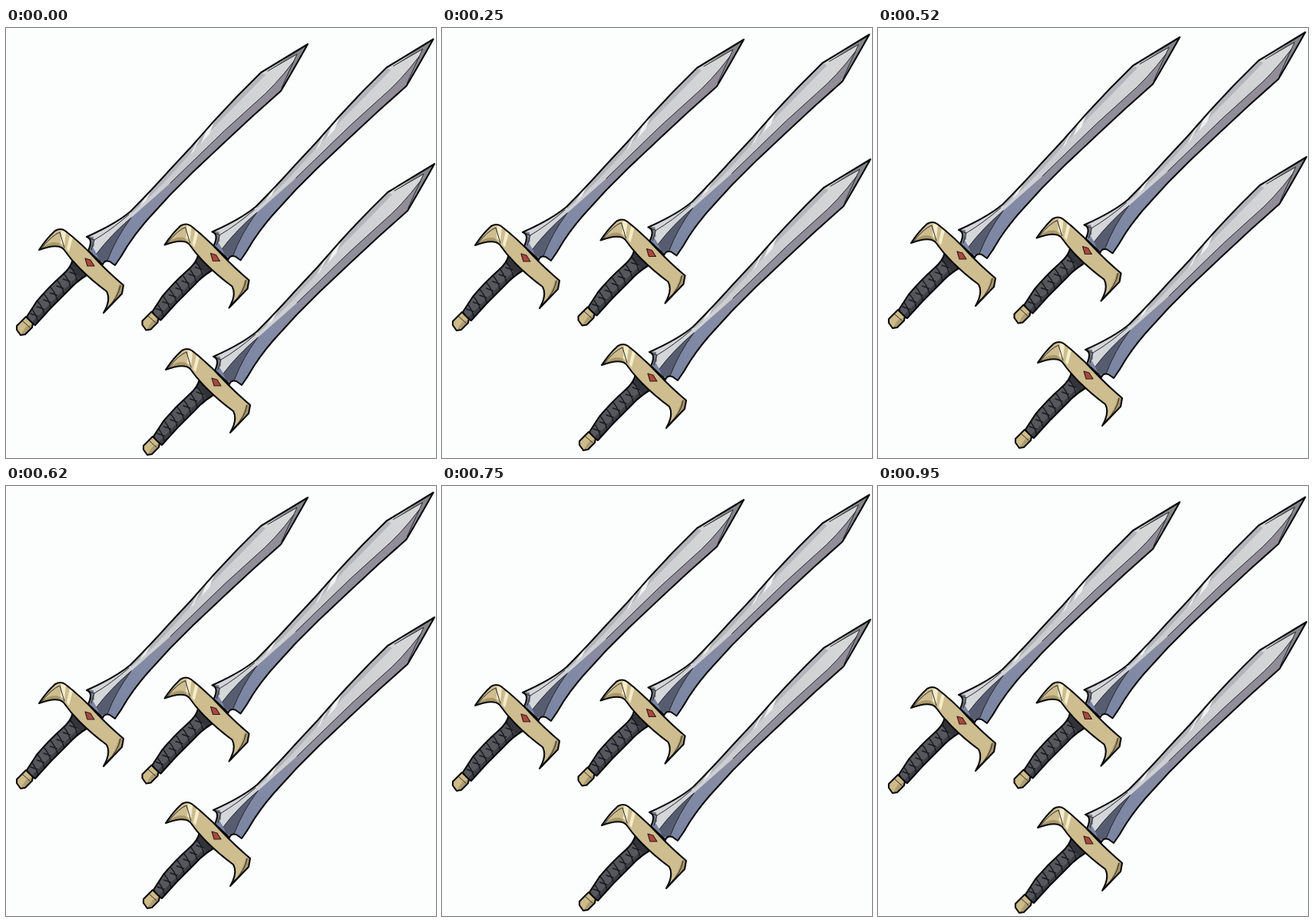
Recreate the animation shown at these times as an HTML page. Size 560 px wide and 560 px high, loop 1 s.

```html
<!DOCTYPE html>
<html lang="en">
<head>
<meta charset="utf-8">
<title>Floating swords</title>
<style>
  html, body { margin: 0; width: 100%; height: 100%; overflow: hidden; background: #fcfefd; }
  svg { display: block; width: 100%; height: 100%; }
  .ink { fill: none; stroke: #08080a; stroke-width: 2.1; stroke-linejoin: round; stroke-linecap: round; }
  .fine { fill: none; stroke: #25252c; stroke-width: 1; stroke-linejoin: round; stroke-linecap: round; }
</style>
</head>
<body>
<svg viewBox="0 0 560 560">
  <defs>
    <linearGradient id="steel" gradientUnits="userSpaceOnUse" x1="370" y1="50" x2="130" y2="300">
      <stop offset="0" stop-color="#918d98"/>
      <stop offset=".58" stop-color="#908e9c"/>
      <stop offset=".78" stop-color="#828aa5"/>
      <stop offset="1" stop-color="#7a85a2"/>
    </linearGradient>
    <linearGradient id="shine" gradientUnits="userSpaceOnUse" x1="370" y1="40" x2="110" y2="285">
      <stop offset="0" stop-color="#d6d7d7"/>
      <stop offset=".55" stop-color="#cacbcf"/>
      <stop offset="1" stop-color="#d5d8db"/>
    </linearGradient>
    <path id="bladeShape" d="M393 21L332 58Q301 88 271 121L241 155L213 185Q187 214 162 239Q143 255 105 272Q114 275 107 290L126 308Q128 302 135 304L142 309Q150 298 158 284Q173 261 193 240L214 217L243 188Q282 151 321 115L358 82Q378 48 393 21Z"/>
    <path id="guardShape" d="M43 289Q53 274 64 264Q71 260 77 264Q100 282 118 302Q133 318 153 335L151 346L127 371Q137 354 131 343Q112 329 96 313Q84 301 75 288Q67 280 43 289Z"/>
    <path id="gripShape" d="M87 301Q85 312 73 322Q55 338 40 356L27 376Q32 384 38 387L58 365L82 341Q92 330 105 322Z"/>
    <path id="pommelShape" d="M26 376L35 385L34 390L25 399L19 400L14 393L14 388L21 381Z"/>
    <clipPath id="bladeClip"><use href="#bladeShape"/></clipPath>
    <clipPath id="guardClip"><use href="#guardShape"/></clipPath>
    <clipPath id="gripClip"><use href="#gripShape"/></clipPath>

    <g id="sword">
      <g clip-path="url(#bladeClip)">
        <use href="#bladeShape" fill="url(#steel)"/>
        <path fill="url(#shine)" d="M393 21L332 58Q301 88 271 121L213 185Q187 214 162 239L105 272L118 294Q136 270 163 247L214 202L246 171Q284 133 325 97Q350 76 375 43Z"/>
        <path fill="#b5b6bb" d="M332 58Q301 88 271 121L213 185Q187 214 162 239L164 241Q192 217 219 187L275 125Q306 94 338 61Z"/>
        <path fill="#85858a" d="M395 19L344 54L379 34L369 60L378 50Z"/>
        <path fill="#eff0f0" d="M262 131L272 120L265 138L254 150ZM250 146L253 143L244 161L240 165ZM186 214L190 210L182 225L174 232Z"/>
        <path fill="#575d70" d="M118 294Q136 270 163 247Q143 274 132 304L122 304Z"/>
        <path fill="#777b84" d="M104 271L114 272L115 284L107 291Z"/>
        <path class="fine" d="M341 56L379 34L359 78M375 43Q350 76 325 97Q284 133 246 171L214 202M163 247Q136 270 118 294M106 273L115 276L111 289M115 276Q137 263 160 243M163 247Q143 274 132 303"/>
      </g>
      <use href="#bladeShape" class="ink"/>

      <g clip-path="url(#gripClip)">
        <use href="#gripShape" fill="#56575c"/>
        <path fill="#3c3d44" d="M105 322L38 387L34 383L78 338L100 316Z"/>
        <path fill="#33343a" d="M85 300L108 323L99 328L82 312Z"/>
        <g id="wraps" class="fine" style="stroke:#17181d;stroke-width:1.4"></g>
      </g>
      <use href="#gripShape" class="ink"/>

      <use href="#pommelShape" fill="#cdbb89"/>
      <path fill="#ad9c70" d="M35 385L34 390L25 399L19 400L26 389Z"/>
      <path class="fine" d="M21 381L31 390"/>
      <use href="#pommelShape" class="ink"/>

      <g clip-path="url(#guardClip)">
        <use href="#guardShape" fill="#cdbd8f"/>
        <path fill="#a99769" d="M43 289Q58 276 69 280L76 288L71 294ZM153 335L147 335Q144 351 127 371L154 347Z"/>
        <path fill="#ddd0a3" d="M64 265L77 263Q99 283 118 303L146 332L116 297L75 260Z"/>
        <path fill="#f5ecc9" d="M72 263L78 266L76 284L71 280ZM83 270L87 273L82 292L79 288Z"/>
        <path class="fine" d="M47 286Q60 270 70 266L76 286M149 335Q146 352 132 364"/>
      </g>
      <use href="#guardShape" class="ink"/>
      <path d="M103 300L110 302L115 310L106 310Z" fill="#a9483d" stroke="#35191a" stroke-width="1.1" stroke-linejoin="round"/>
    </g>
  </defs>

  <g id="swords">
    <use href="#sword"/>
    <use href="#sword" x="163.5" y="-6.5"/>
    <use href="#sword" x="165" y="156"/>
  </g>
</svg>
<script>
  const LOOP = 1000, STEP = 3;
  const changes = [120, 250, 370, 620, 750, 870];

  // Leather bands, evenly spaced from the pommel up to the guard.
  const bands = Array.from({ length: 7 }, (_, i) => {
    const x = 31 + i * 8.5, y = 363 - i * 9;
    return `M${x} ${y}q8 8 11 21M${x + 1} ${y + 9}l9 3`;
  });
  document.getElementById("wraps").innerHTML = `<path d="${bands.join("")}"/>`;

  const swords = document.getElementById("swords");
  const start = performance.now();

  function draw() {
    const time = (performance.now() - start) % LOOP;
    const passed = changes.filter(change => time >= change).length;
    const lift = STEP * Math.min(passed, changes.length - passed);
    swords.setAttribute("transform", `translate(0 ${-lift})`);
    requestAnimationFrame(draw);
  }
  draw();
</script>
</body>
</html>
```
